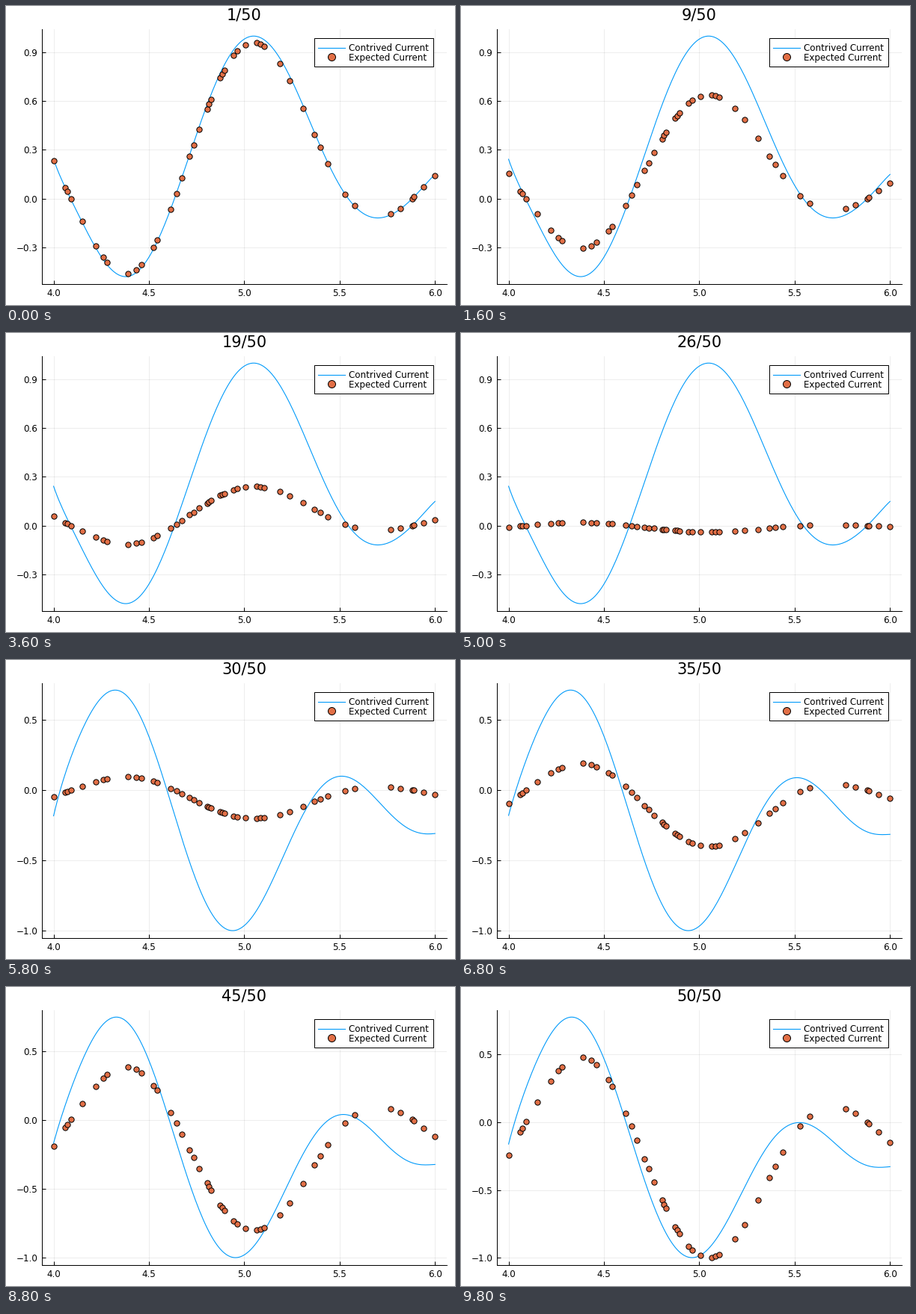
Recreate the animation shown at these times as a matplotlib script. Size 600x400 px, loop 10 s.

```python
import numpy as np
import matplotlib.pyplot as plt
from matplotlib.animation import FuncAnimation
from matplotlib.patches import Rectangle
from matplotlib.ticker import FuncFormatter, MultipleLocator

W, H, DPI = 600, 400, 100
STEPS = 50
PX = 72 / DPI  # points per pixel
BLUE, ORANGE = "#009afa", "#e26f46"
LEFT, RIGHT, TOP, BOTTOM = 48.3, 588.6, 30.6, 371.7

plt.rcParams["font.family"] = "DejaVu Sans"
plt.rcParams["font.size"] = 11.95 * PX


def smooth_curve(points, turns, degree):
    """Polynomial through points, level at each turning point."""
    powers = np.arange(degree + 1)
    rows, rhs = [], []
    for x, y in list(points) + list(turns):
        rows.append((x - 5.0) ** powers)
        rhs.append(y)
    for x, _ in turns:
        rows.append(powers * (x - 5.0) ** np.maximum(powers - 1, 0))
        rhs.append(0.0)
    coef = np.linalg.lstsq(np.array(rows), np.array(rhs), rcond=None)[0]
    return lambda x: np.polynomial.polynomial.polyval(x - 5.0, coef)


def through(n, a, b, c):
    """Quadratic in n with values a, b, c at steps 35, 40 and 50."""
    return (a * (n - 40) * (n - 50) / 75
            - b * (n - 35) * (n - 50) / 50
            + c * (n - 35) * (n - 40) / 150)


xs = np.linspace(4, 6, 200)
samples = np.array([
    0, 6, 7, 9, 15, 22, 26, 28, 39, 43, 46, 52, 54, 61, 64, 67, 71, 73, 76,
    80, 81, 82, 87, 88, 89, 94, 96, 100, 106, 108, 110, 118, 123, 130, 136,
    139, 143, 152, 157, 176, 181, 187, 188, 193, 199])

base = smooth_curve(
    [(4.0, 0.242), (4.0905, -0.003), (4.221, -0.31), (4.543, -0.27),
     (4.6734, 0.1347), (4.804, 0.5814), (4.9447, 0.92), (5.186, 0.866),
     (5.3065, 0.58), (5.437, 0.2214), (5.5276, 0.0237), (5.819, -0.0585),
     (5.94, 0.0734), (6.0, 0.149)],
    [(4.378, -0.478), (5.049, 1.0), (5.70, -0.12)], 11)(xs)
base /= base.max()


def contrived(n):
    if n <= 26:
        return base
    y = smooth_curve(
        [(4.0, through(n, -0.179, -0.174, -0.161)),
         (6.0, through(n, -0.314, -0.319, -0.328))],
        [(through(n, 4.325, 4.327, 4.331), through(n, 0.714, 0.7255, 0.777)),
         (through(n, 4.942, 4.947, 4.962), -1.0),
         (through(n, 5.512, 5.515, 5.525), through(n, 0.09, 0.07, -0.002)),
         (through(n, 5.96, 5.955, 5.945), through(n, -0.316, -0.321, -0.333))],
        9)(xs)
    return y / np.abs(y).max()


fig = plt.figure(figsize=(W / DPI, H / DPI), dpi=DPI, facecolor="white")
ax = fig.add_axes([LEFT / W, 1 - BOTTOM / H,
                   (RIGHT - LEFT) / W, (BOTTOM - TOP) / H])
ax.set_xlim(3.94, 6.06)
ax.xaxis.set_major_locator(MultipleLocator(0.5))
label = FuncFormatter(lambda v, _: f"{round(v, 1) + 0.0:.1f}".replace("-", "\u2212"))
ax.xaxis.set_major_formatter(label)
ax.yaxis.set_major_formatter(label)
ax.spines[["top", "right"]].set_visible(False)
ax.spines[["left", "bottom"]].set_linewidth(PX)
ax.tick_params(direction="in", length=5 * PX, width=PX)
ax.tick_params(axis="x", pad=6.2 * PX)
ax.tick_params(axis="y", pad=5.8 * PX)
ax.set_axisbelow(True)
ax.grid(color="black", alpha=0.1, linewidth=0.7 * PX)

line, = ax.plot([], [], color=BLUE, lw=1.1 * PX, zorder=3)
dots, = ax.plot([], [], "o", ms=7.3 * PX, mfc=ORANGE, mec="black",
                mew=PX, zorder=4)

# Overlay in pixel coordinates for the title and legend
over = fig.add_axes([0, 0, 1, 1])
over.set_xlim(0, W)
over.set_ylim(H, 0)
over.axis("off")
title = over.text((LEFT + RIGHT) / 2, 18.4, "", ha="center", va="baseline",
                  fontsize=20.9 * PX)
over.add_patch(Rectangle((411.5, 42.5), 159, 38.5, fc="white", ec="black",
                         lw=PX, zorder=5))
over.plot([417, 453], [55.5, 55.5], color=BLUE, lw=1.1 * PX, zorder=6)
over.plot([435], [68.4], "o", ms=10 * PX, mfc=ORANGE, mec="black",
          mew=PX, zorder=6)
over.text(458, 59.9, "Contrived Current", va="baseline", zorder=6)
over.text(457.5, 72.9, "Expected Current", va="baseline", zorder=6)


def draw(i):
    n = i + 1
    curve = contrived(n)
    expected = (1 - 2 * n / STEPS) * base[samples]
    line.set_data(xs, curve)
    dots.set_data(xs[samples], expected)
    low = min(curve.min(), expected.min())
    high = max(curve.max(), expected.max())
    margin = 0.03 * (high - low)
    ax.set_ylim(low - margin, high + margin)
    ax.yaxis.set_major_locator(MultipleLocator(0.3 if n <= 26 else 0.5))
    title.set_text(f"{n}/{STEPS}")
    return line, dots, title


anim = FuncAnimation(fig, draw, frames=STEPS, interval=200,
                     init_func=lambda: draw(0), repeat=True, repeat_delay=0)
plt.show()
```
